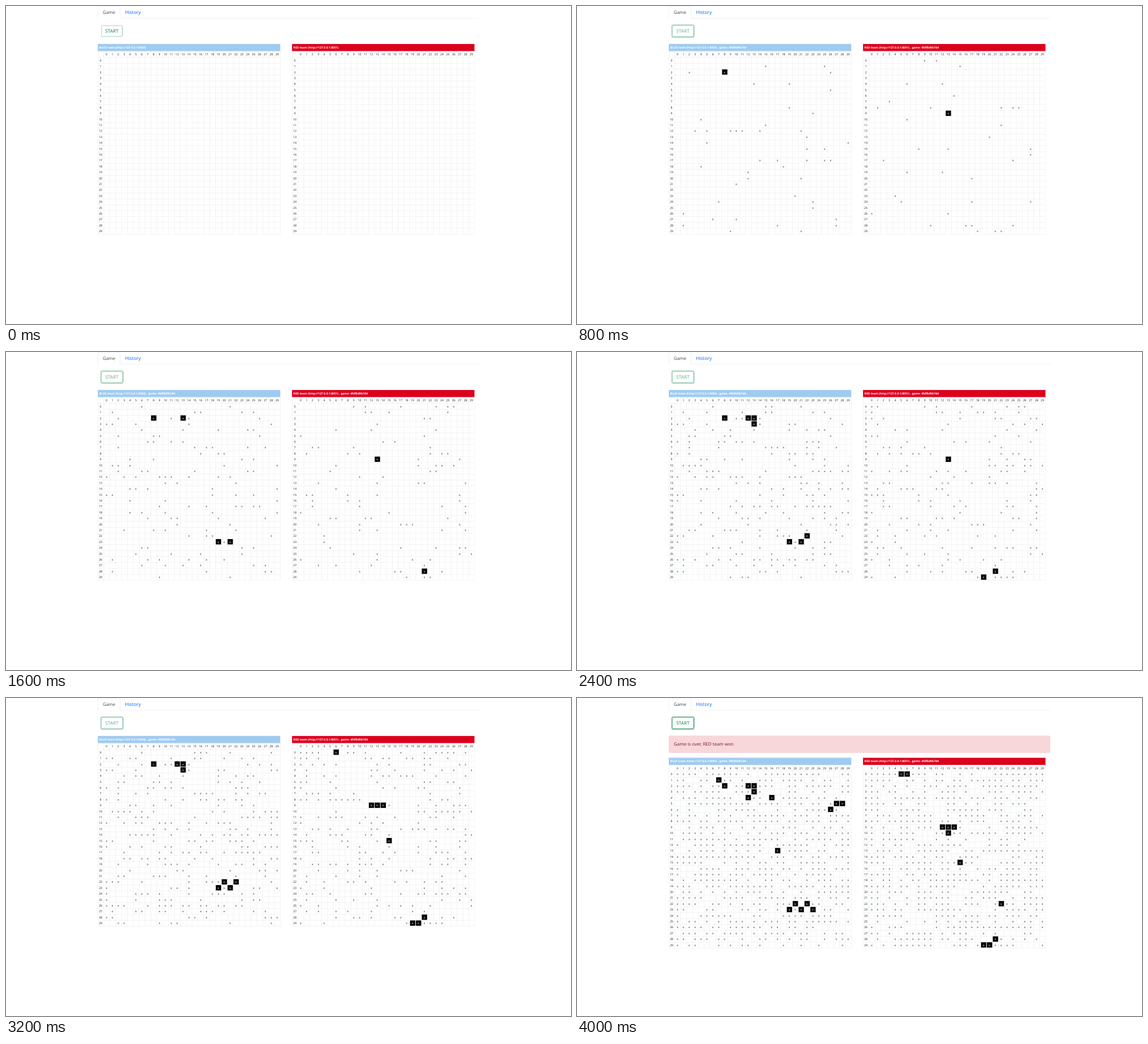
Recreate the animation shown at these times as an HTML page. Size 998 px wide and 561 px high, loop 4.8 s.

```html
<!DOCTYPE html>
<html lang="en">
<head>
<meta charset="utf-8">
<title>Game</title>
<style>
  html, body { margin: 0; width: 100%; height: 100%; overflow: hidden; background: #fff; }
  svg { display: block; width: 998px; height: 561px; }
  text { font: 16px "Noto Sans", sans-serif; fill: #212529; text-rendering: geometricPrecision; }
  .line { fill: none; stroke: #dee2e6; }
  .grid { fill: none; stroke: #e6e8ea; }
  .cell { font-size: 10px; text-anchor: middle; }
  .title { font-size: 9.65px; font-weight: 700; fill: #fff; }
  .hit { fill: #fff; }
</style>
</head>
<body>
<svg id="stage" viewBox="0 0 1920 1079.28" preserveAspectRatio="xMinYMin">
  <path class="line" d="M388 41.5H1608M312.5 42V4.5q0-4 4-4H383.5q4 0 4 4V42"/>
  <text x="329" y="26.5" style="font-size:15.1px;fill:#495057">Game</text>
  <text x="404.5" y="26.5" style="fill:#0d6efd">History</text>
  <g id="button">
    <rect id="ring" x="322" y="64" width="76" height="42" rx="6" fill="none" stroke="#198754" stroke-opacity=".5" stroke-width="4"/>
    <rect x="324.5" y="66.5" width="71" height="37" rx="4" fill="#fff" stroke="#198754"/>
    <text x="337" y="90.7" style="font-size:15.8px;fill:#198754">START</text>
  </g>
  <g id="alert">
    <rect x="312.5" y="128.5" width="1295" height="57" rx="4" fill="#f8d7da" stroke="#f5c2c7"/>
    <text x="329" y="162.5" style="font-size:15.25px;fill:#842029">Game is over, RED team won</text>
  </g>
  <g id="boards"></g>
</svg>
<script>
const SIZE = 30, CELL = 20, TOP = 174, STEPS = 6, LOOP = 4800;
// Share of the cells shot at by each step
const FILL = [0, 0.05, 0.13, 0.235, 0.32, 0.63];

// Hits are grouped by step, as row * SIZE + column
const TEAMS = [
  {
    name: "BLUE", port: 8050, x: 312, color: "#9fcbf0", seed: 11,
    hits: [[], [68], [73, 709, 711], [72, 103, 682], [680], [37, 132, 136, 177, 178, 206, 407, 713]]
  },
  {
    name: "RED", port: 8051, x: 972, color: "#dc001c", seed: 29,
    hits: [[], [283], [861], [889], [6, 282, 284, 465, 890], [5, 313, 682]]
  }
];

const byId = id => document.getElementById(id);

function add(parent, tag, attrs, content) {
  const el = document.createElementNS("http://www.w3.org/2000/svg", tag);
  for (const key in attrs) el.setAttribute(key, attrs[key]);
  if (content !== undefined) el.textContent = content;
  parent.append(el);
  return el;
}

// Holds one value per step, with hard changes
function hold(el, prop, valueAt) {
  const frames = FILL.map((_, i) => ({ [prop]: valueAt(i), offset: i / STEPS, easing: "step-end" }));
  frames.push({ [prop]: valueAt(STEPS - 1), offset: 1 });
  el.animate(frames, { duration: LOOP, iterations: Infinity });
}

const showFrom = (el, step) => hold(el, "visibility", i => i < step ? "hidden" : "visible");

function random(seed) {
  return () => {
    seed = seed + 0x6d2b79f5 | 0;
    let t = Math.imul(seed ^ seed >>> 15, 1 | seed);
    t = t + Math.imul(t ^ t >>> 7, 61 | t) ^ t;
    return ((t ^ t >>> 14) >>> 0) / 4294967296;
  };
}

function drawFrame(board, { x, name, port, color }) {
  const width = (SIZE + 1) * CELL, bottom = TOP + SIZE * CELL;
  let grid = `M${x} 128.5h${width}`;
  for (let i = 0; i <= SIZE + 1; i++) {
    grid += `M${x + i * CELL + 0.5} 153V${bottom}`;
    grid += `M${x} ${TOP + (i - 1) * CELL + 0.5}h${width}`;
  }
  add(board, "path", { class: "grid", d: grid });
  add(board, "rect", { x, y: 129, width, height: 24, fill: color });

  const title = `${name} team (http://127.0.0.1:${port})`;
  const label = add(board, "text", { class: "title", x: x + 5, y: 144 }, title);
  showFrom(add(label, "tspan", {}, " , game: 4fdf8d9b7d4"), 1);

  for (let i = 0; i < SIZE; i++) {
    add(board, "text", { class: "cell", x: x + (i + 1.5) * CELL - 0.5, y: TOP - 6 }, i);
    add(board, "text", { class: "cell", x: x + 9.5, y: TOP + i * CELL + 14 }, i);
  }
}

function drawShots(board, team) {
  const next = random(team.seed);
  const layers = FILL.map((_, step) => {
    const layer = add(board, "g", {});
    showFrom(layer, step);
    return layer;
  });
  for (let cell = 0; cell < SIZE * SIZE; cell++) {
    const chance = next();
    const hitStep = team.hits.findIndex(list => list.includes(cell));
    const hit = hitStep > 0;
    const step = hit ? hitStep : FILL.findIndex(share => chance < share);
    if (step < 0) continue;
    const x = team.x + (cell % SIZE + 1) * CELL;
    const y = TOP + Math.floor(cell / SIZE) * CELL;
    if (hit) add(layers[step], "rect", { x: x + 1, y: y + 1, width: 18, height: 18 });
    add(layers[step], "text", { class: hit ? "cell hit" : "cell", x: x + 9.5, y: y + 14 }, "x");
  }
}

for (const team of TEAMS) {
  const board = add(byId("boards"), "g", {});
  drawFrame(board, team);
  drawShots(board, team);
}

const last = STEPS - 1;
showFrom(byId("ring"), 1);
showFrom(byId("alert"), last);
hold(byId("button"), "opacity", i => i > 0 && i < last ? 0.65 : 1);
hold(byId("boards"), "transform", i => `translateY(${i < last ? 0 : 74}px)`);
</script>
</body>
</html>
```
